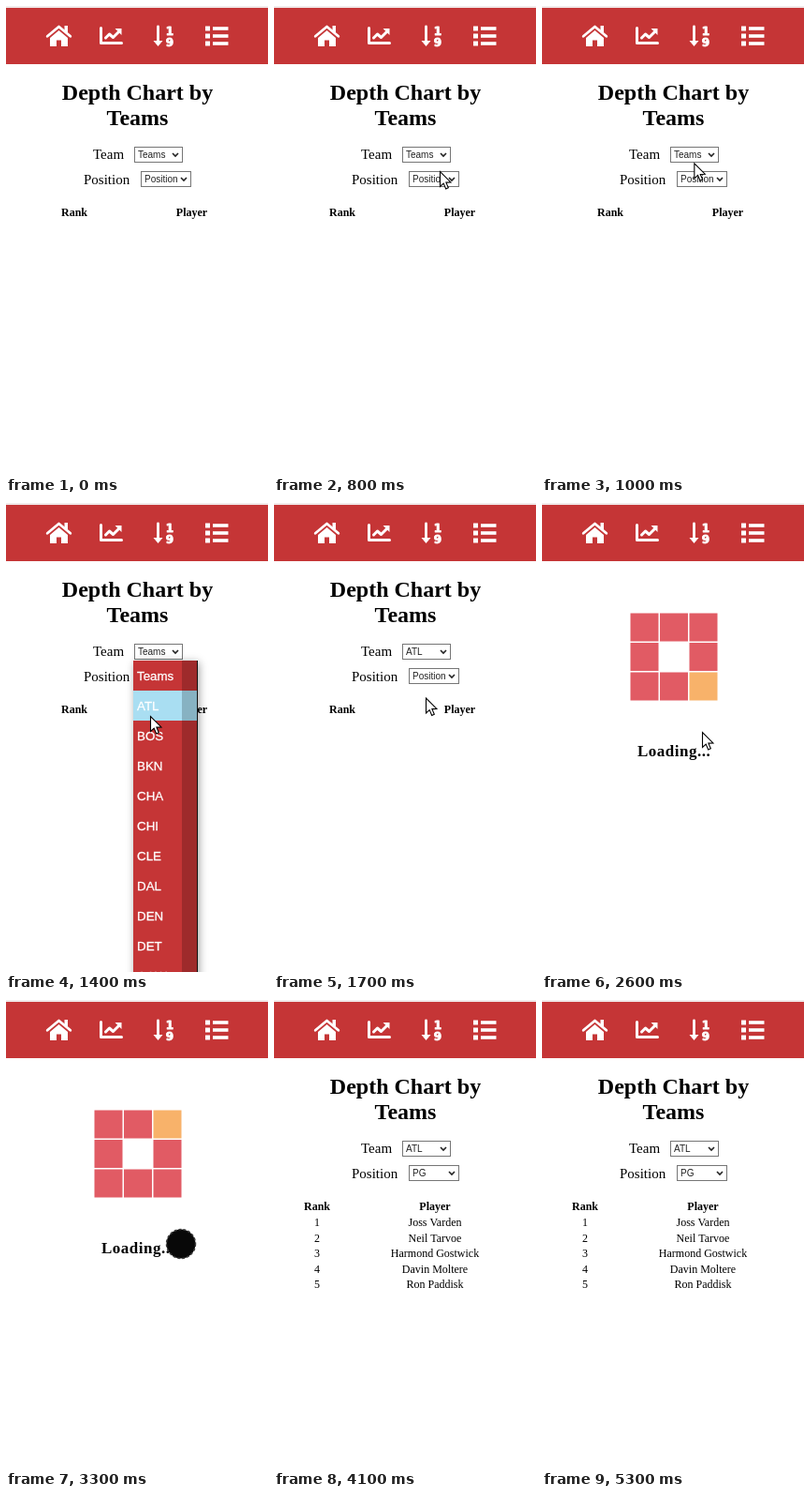
An HTML page with a canvas that plays this animation: 280x500 px, repeating every 5400 ms.

```html
<!DOCTYPE html>
<html lang="en">
<head>
<meta charset="utf-8">
<title>Depth Chart</title>
<style>
html, body { margin: 0; width: 100%; height: 100%; overflow: hidden; background: #fff; }
canvas { display: block; width: 280px; height: 500px; }
</style>
</head>
<body>
<canvas id="stage"></canvas>
<script>
const W = 280, H = 500, LOOP = 5400, STEP = 100, ROW = 32;
const RED = '#c53536', BLUE = '#a9def2', WHITE = '#fff';
const SERIF = '"Liberation Serif", "Times New Roman", serif';
const SANS = '"Liberation Sans", Arial, sans-serif';

const TEAMS = ['Teams', 'ATL', 'BOS', 'BKN', 'CHA', 'CHI', 'CLE', 'DAL', 'DEN', 'DET', 'GSW'];
const POSITIONS = ['Position', 'PG', 'SG', 'SF', 'PF', 'C'];
const PLAYERS = ['Joss Varden', 'Neil Tarvoe', 'Harmond Gostwick', 'Davin Moltere', 'Ron Paddisk'];

// Moments of the story, in ms
const T = {
  enter: 100, teamOpen: 1100, teamPick: 1600,
  posOpen: 2000, load: 2500, touch: 2900, done: 3500
};

// Places the pointer visits
const STOPS = [
  { at: T.enter, x: 9, y: 1 },
  { at: 800, x: 177, y: 176 },
  { at: T.teamOpen, x: 155, y: 163 },
  { at: 1400, x: 154, y: 227 },
  { at: T.posOpen, x: 170, y: 188 },
  { at: 2200, x: 171, y: 223 },
  { at: 2600, x: 171, y: 244 },
  { at: 3000, x: 187, y: 260 }
];

const canvas = document.getElementById('stage');
const ctx = canvas.getContext('2d');
const dpr = window.devicePixelRatio || 1;
canvas.width = W * dpr;
canvas.height = H * dpr;
ctx.scale(dpr, dpr);

function rect(x, y, w, h, color) {
  ctx.fillStyle = color;
  ctx.fillRect(x, y, w, h);
}

// A weight above 0 thickens the letters slightly
function text(str, x, y, font, color = '#000', align = 'left', weight = 0) {
  ctx.font = font;
  ctx.fillStyle = ctx.strokeStyle = color;
  ctx.textAlign = align;
  ctx.fillText(str, x, y);
  if (weight) {
    ctx.lineWidth = weight;
    ctx.strokeText(str, x, y);
  }
}

function trace(points) {
  ctx.beginPath();
  points.forEach(([x, y]) => ctx.lineTo(x, y));
}

function line(points, width, color) {
  trace(points);
  ctx.lineWidth = width;
  ctx.strokeStyle = color;
  ctx.stroke();
}

function poly(points, color) {
  trace(points);
  ctx.closePath();
  ctx.fillStyle = color;
  ctx.fill();
}

// Open angle pointing up (dy < 0) or down (dy > 0)
function chevron(x, y, dx, dy) {
  return [[x - dx, y - dy], [x, y], [x + dx, y - dy]];
}

function houseIcon(x, y) {
  line(chevron(x, y + 3, 12.3, -10.3), 2.8, WHITE);
  rect(x + 6, y + 2, 3.5, 7, WHITE);
  poly(chevron(x, y + 7, 9.5, -8), WHITE);
  rect(x - 9.5, y + 15, 19, 9, WHITE);
  rect(x - 2.5, y + 17.5, 5, 6.5, RED);
}

function chartIcon(x, y) {
  line([[x, y], [x, y + 16], [x + 22, y + 16]], 3, WHITE);
  line([[x + 5, y + 10.5], [x + 9, y + 6.5], [x + 13, y + 10], [x + 19, y + 4]], 3, WHITE);
  poly([[x + 15, y + .5], [x + 22, y + .5], [x + 22, y + 7.5]], WHITE);
}

function sortIcon(x, y) {
  line([[x, y], [x, y + 16]], 2.8, WHITE);
  poly(chevron(x, y + 21, 5, 6), WHITE);
  [1, 9].forEach((n, i) =>
    text(n, x + 12.5, y + 8.5 + 12 * i, 'bold 12px "DejaVu Sans", sans-serif', WHITE, 'center', .9));
}

function listIcon(x, y) {
  for (let i = 0; i < 3; i++) {
    rect(x, y + 8 * i, 5, 5, WHITE);
    rect(x + 8, y + .7 + 8 * i, 16.5, 3.6, WHITE);
  }
}

function header() {
  rect(0, 0, W, 2, '#f1e9e9');
  rect(0, 2, W, 60, RED);
  ctx.lineJoin = ctx.lineCap = 'round';
  houseIcon(56.5, 19);
  chartIcon(101.5, 23.5);
  sortIcon(162.5, 22);
  listIcon(213, 21.5);
  ctx.lineJoin = 'miter';
  ctx.lineCap = 'butt';
}

function select(x, y, w, label) {
  ctx.strokeStyle = '#767676';
  ctx.lineWidth = 1;
  ctx.strokeRect(x + .5, y + .5, w - 1, 16);
  text(label, x + 4, y + 12, '10px ' + SANS, '#222');
  line(chevron(x + w - 8, y + 10, 3, 3), 1.6, '#222');
}

function form(team, position) {
  ['Depth Chart by', 'Teams'].forEach((str, i) =>
    text(str, 140.5, 100 + 27 * i, 'bold 24px ' + SERIF, '#000', 'center'));
  text('Team', 93, 163, '15px ' + SERIF);
  text('Position', 83, 190, '15px ' + SERIF);
  select(137, 150, 52, team);
  select(144, 176, 54, position);
}

function table(full) {
  const rank = full ? 46 : 73, player = full ? 172 : 198.5;
  const row = (a, b, y, font) => {
    text(a, rank, y, font + SERIF, '#000', 'center');
    text(b, player, y, font + SERIF, '#000', 'center');
  };
  row('Rank', 'Player', 224, 'bold 12px ');
  if (full) PLAYERS.forEach((name, i) => row(i + 1, name, 241 + 16.5 * i, '12px '));
}

function menu(items, x, y, w, pad, pointerY, scrollbar) {
  const h = ROW * items.length;
  const active = Math.max(0, Math.floor((pointerY - y) / ROW));
  ctx.save();
  ctx.shadowColor = 'rgba(0,0,0,.4)';
  ctx.shadowBlur = 9 * dpr;
  ctx.shadowOffsetX = ctx.shadowOffsetY = 2 * dpr;
  rect(x, y, w, h, RED);
  ctx.restore();
  items.forEach((item, i) => {
    const top = y + ROW * i;
    if (i === active) rect(x, top, w, ROW, BLUE);
    text(item, x + pad, top + 21, '13.33px ' + SANS, WHITE, 'left', .3);
  });
  if (scrollbar) rect(x + w - 16, y, 16, h, 'rgba(0,0,0,.2)');
  rect(x + w, y, 1, h + 1, '#111');
  rect(x, y + h, w, 1, '#111');
}

function loader(t) {
  // Eight cells clockwise from the top left, one lit at a time
  const lit = Math.floor((t - 2010) / 125) % 8;
  for (let i = 0; i < 8; i++) {
    const a = (i - 3) * Math.PI / 4;
    const x = 126 + 31.5 * Math.round(Math.cos(a));
    const y = 149 + 31.5 * Math.round(Math.sin(a));
    rect(x, y, 30, 30, i === lit ? '#f8b26a' : '#e15b64');
  }
  ctx.letterSpacing = '0.5px';
  text('Loading...', 102, 270, 'bold 17px ' + SERIF);
  ctx.letterSpacing = '0px';
}

function pointerAt(t) {
  const next = STOPS.findIndex(s => s.at > t);
  const b = STOPS.at(next), a = next > 0 ? STOPS[next - 1] : b;
  const k = a === b ? 0 : (t - a.at) / (b.at - a.at);
  return { x: a.x + (b.x - a.x) * k, y: a.y + (b.y - a.y) * k };
}

function arrow(x, y) {
  const shape = [[0, 0], [0, 16], [3.7, 12.6], [6.2, 18.4], [8.8, 17.2], [6.4, 11.6], [11.4, 11.4]];
  poly(shape.map(([dx, dy]) => [x + .5 + dx, y + .5 + dy]), WHITE);
  ctx.lineWidth = 1.1;
  ctx.strokeStyle = '#000';
  ctx.stroke();
}

function touchDot(x, y) {
  ctx.beginPath();
  ctx.arc(x, y, 15.5, 0, 2 * Math.PI);
  ctx.fillStyle = '#080808';
  ctx.fill();
  ctx.lineWidth = 1.5;
  ctx.strokeStyle = '#3c3c3c';
  ctx.setLineDash([3, 2]);
  ctx.stroke();
  ctx.setLineDash([]);
}

function draw(t) {
  const within = (from, to) => t >= from && t < to;
  const { x, y } = pointerAt(t);
  const done = t >= T.done;

  rect(0, 0, W, H, WHITE);
  header();
  if (within(T.load, T.done)) {
    loader(t);
  } else {
    form(TEAMS[t < T.teamPick ? 0 : 1], POSITIONS[done ? 1 : 0]);
    table(done);
  }
  if (within(T.teamOpen, T.teamPick)) menu(TEAMS, 136, 168, 68, 4, y, true);
  if (within(T.posOpen, T.load)) menu(POSITIONS, 144, 192, 71, 5, y, false);
  if (within(T.enter, T.touch)) arrow(x, y);
  if (within(T.touch, T.done)) touchDot(x, y);
}

const start = performance.now();
function tick() {
  const t = (performance.now() - start) % LOOP;
  draw(Math.floor(t / STEP) * STEP);
  requestAnimationFrame(tick);
}
tick();
</script>
</body>
</html>
```
